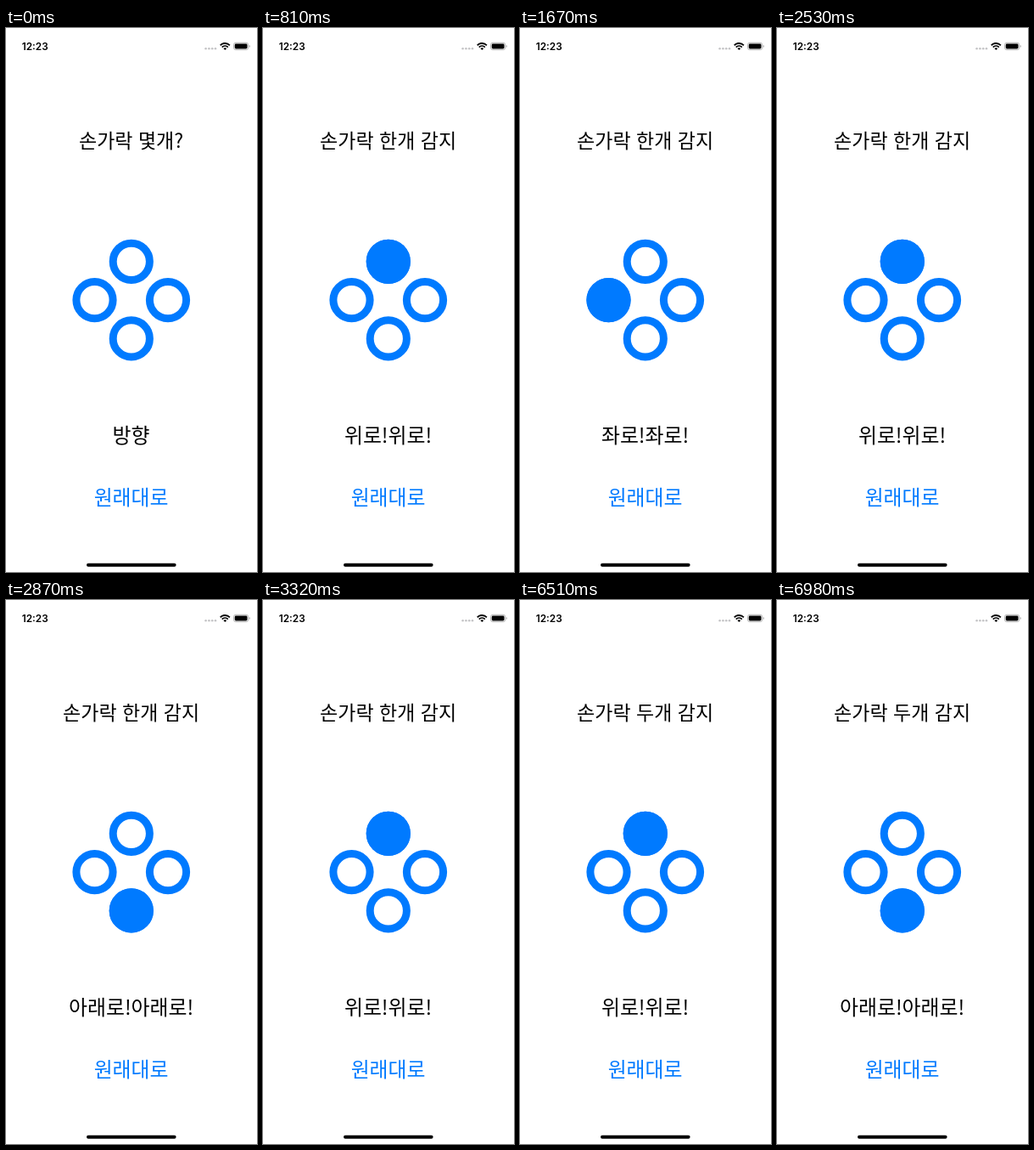
Recreate the animation shown at these times as an HTML page. Size 296 by 640 pixels, loop 8 s.

```html
<!DOCTYPE html>
<html lang="ko">
<head>
<meta charset="utf-8">
<title>손가락 방향</title>
<style>
  html, body { margin: 0; width: 100%; height: 100%; overflow: hidden; background: #fff; }
  svg { display: block; width: 100vw; height: 100vh; }
  text { font: 400 23.9px "Noto Sans CJK KR", "Noto Sans CJK", sans-serif; text-anchor: middle; }
  .title text { font-size: 23px; }
  .clock { font: 600 11.8px Inter, sans-serif; }
  .blue { fill: #007aff; }
  .ring { fill: none; stroke: #007aff; stroke-width: 9; }

  /* Every state switches hard, without blending. */
  .state { visibility: hidden; animation: 8s step-end infinite; }
  .idle  { animation-name: idle; }
  .one   { animation-name: one; }
  .two   { animation-name: two; }
  .up    { animation-name: up; }
  .down  { animation-name: down; }
  .left  { animation-name: left; }
  .right { animation-name: right; }

  @keyframes idle {
    0% { visibility: visible; }
    10.125%, 100% { visibility: hidden; }
  }
  @keyframes one {
    0%, 81.375%, 100% { visibility: hidden; }
    10.125% { visibility: visible; }
  }
  @keyframes two {
    0% { visibility: hidden; }
    81.375%, 100% { visibility: visible; }
  }
  @keyframes up {
    0%, 15.125%, 35.875%, 46.5%, 87.25%, 100% { visibility: hidden; }
    10.125%, 31.625%, 41.5%, 81.375% { visibility: visible; }
  }
  @keyframes down {
    0%, 20.875%, 41.5% { visibility: hidden; }
    15.125%, 35.875%, 87.25%, 100% { visibility: visible; }
  }
  @keyframes left {
    0%, 25.875%, 100% { visibility: hidden; }
    20.875% { visibility: visible; }
  }
  @keyframes right {
    0%, 31.625%, 81.375%, 100% { visibility: hidden; }
    25.875%, 46.5% { visibility: visible; }
  }
</style>
</head>
<body>
<svg viewBox="0 0 296 640" preserveAspectRatio="none">
  <text class="clock" x="34.2" y="25.8">12:23</text>

  <g fill="#c4c4c6">
    <circle cx="235.6" cy="24.3" r="1.3"/>
    <circle cx="239.4" cy="24.3" r="1.3"/>
    <circle cx="243.2" cy="24.3" r="1.3"/>
    <circle cx="247" cy="24.3" r="1.3"/>
  </g>
  <g fill="none" stroke="#000" stroke-width="1.8">
    <path d="M252.7 20.3a8 8 0 0 1 11.2 0"/>
    <path d="M254.8 22.6a5 5 0 0 1 7 0"/>
  </g>
  <path d="M256.4 24.1a2.8 2.8 0 0 1 3.8 0l-1.9 2z"/>
  <rect x="268.5" y="17.3" width="17.2" height="8.4" rx="2.5" fill="none" stroke="#a6a6a6" stroke-width=".8"/>
  <rect x="269.7" y="18.5" width="14.8" height="6" rx="1.4"/>
  <path d="M286.7 20v3a1.6 1.6 0 0 0 0-3z" fill="#a6a6a6"/>

  <g class="title">
    <text class="state idle" x="147.6" y="141.3">손가락 몇개?</text>
    <text class="state one" x="147.6" y="141.3">손가락 한개 감지</text>
    <text class="state two" x="147.6" y="141.3">손가락 두개 감지</text>
  </g>

  <g class="ring">
    <circle cx="147.8" cy="274.8" r="21.6"/>
    <circle cx="104.5" cy="320.1" r="21.6"/>
    <circle cx="191" cy="320.1" r="21.6"/>
    <circle cx="147.8" cy="365.4" r="21.6"/>
  </g>

  <text class="state idle" x="147.6" y="488.3">방향</text>
  <g class="state up">
    <circle class="blue" cx="147.8" cy="274.8" r="26.1"/>
    <text x="147.6" y="488.3">위로!위로!</text>
  </g>
  <g class="state down">
    <circle class="blue" cx="147.8" cy="365.4" r="26.1"/>
    <text x="147.6" y="488.3">아래로!아래로!</text>
  </g>
  <g class="state left">
    <circle class="blue" cx="104.5" cy="320.1" r="26.1"/>
    <text x="147.6" y="488.3">좌로!좌로!</text>
  </g>
  <g class="state right">
    <circle class="blue" cx="191" cy="320.1" r="26.1"/>
    <text x="147.6" y="488.3">우로!우로!</text>
  </g>

  <text class="blue" x="147.6" y="561.3">원래대로</text>
  <rect x="95" y="629.7" width="105.6" height="4" rx="2"/>
</svg>
</body>
</html>
```
